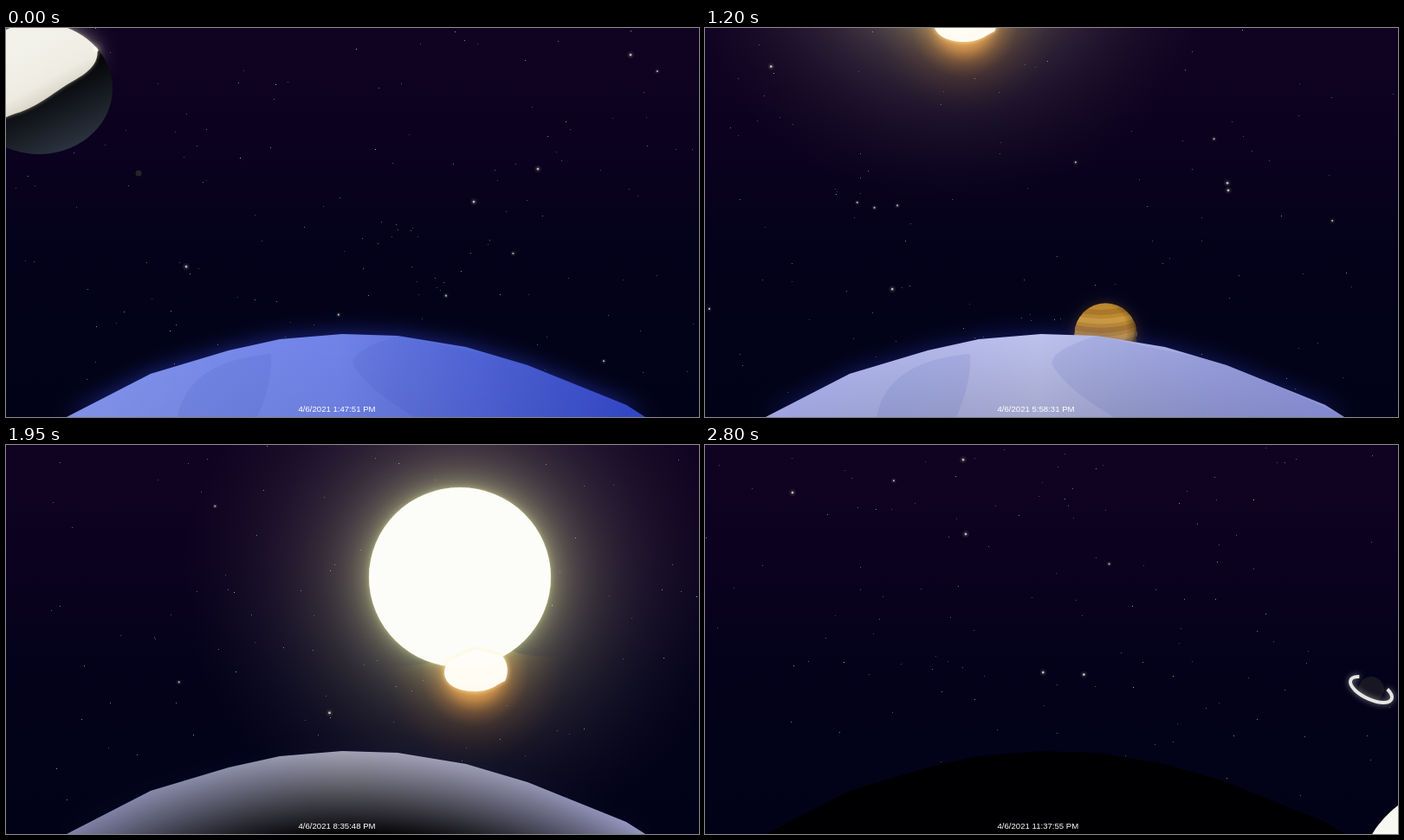
Animation of 800x450 px, one loop 2850 ms. Source, as an HTML page with a canvas:

```html
<!DOCTYPE html>
<html lang="en">
<head>
<meta charset="utf-8">
<title>Night sky</title>
<style>
html, body { margin: 0; width: 100%; height: 100%; overflow: hidden; background: #03021a; }
canvas { display: block; width: 800px; height: 450px; }
</style>
</head>
<body>
<canvas id="stage" width="800" height="450"></canvas>
<script>
const W = 800, H = 450, LOOP = 2850, STEP = 50, FOCAL = 480;
const ctx = document.getElementById('stage').getContext('2d');

// Key steps and the clock (seconds of the day) at each of them
const KEYS = [0, 7, 16, 31, 39, 48, 56];
const CLOCK = [49671, 53870, 59747, 69055, 74148, 80036, 85075];

const mix = (a, b, k) => Array.isArray(a) ? a.map((v, i) => mix(v, b[i], k)) : a + (b - a) * k;
const rgb = (c, a = 1) => `rgba(${c.map(Math.round).join(',')},${a})`;

// Straight lines between key values, held before the first and after the last
function at(values, step, keys = KEYS) {
  const last = values.length - 1;
  if (step <= keys[0]) return values[0];
  if (step >= keys[last]) return values[last];
  const i = keys.findIndex(k => k > step) - 1;
  return mix(values[i], values[i + 1], (step - keys[i]) / (keys[i + 1] - keys[i]));
}

// Smooth curve through a few [step, x, y] points, continued past both ends
function track(points, step) {
  const out = [0, 0];
  for (const p of points) {
    let w = 1;
    for (const q of points) if (q !== p) w *= (step - q[0]) / (p[0] - q[0]);
    out[0] += w * p[1];
    out[1] += w * p[2];
  }
  return out;
}

// The sky turns about one fixed axis, seen through a pinhole camera
const SPIN = [-0.0279, 0.0257, 0.0066];
const RATE = Math.hypot(...SPIN);
const AXIS = SPIN.map(v => v / RATE);

function turn([x, y, z], angle) {
  const [a, b, c] = AXIS, s = Math.sin(angle), co = Math.cos(angle);
  const d = (a * x + b * y + c * z) * (1 - co);
  return [
    x * co + (b * z - c * y) * s + a * d,
    y * co + (c * x - a * z) * s + b * d,
    z * co + (a * y - b * x) * s + c * d
  ];
}
const skyAngle = step => (at(CLOCK, step) - CLOCK[0]) * RATE / FOCAL;

function fix(step, x, y) {
  const v = [x - W / 2, y - H / 2, FOCAL], n = Math.hypot(...v);
  return turn(v.map(c => c / n), -skyAngle(step));
}

function project(v, angle) {
  const [x, y, z] = turn(v, angle);
  return z > 0.2 ? [W / 2 + FOCAL * x / z, H / 2 + FOCAL * y / z] : null;
}

let seed = 20214;
function rand() {
  seed = (seed * 1664525 + 1013904223) >>> 0;
  return seed / 4294967296;
}

function anywhere() {
  const z = rand() * 2 - 1, a = rand() * Math.PI * 2, r = Math.sqrt(1 - z * z);
  return [r * Math.cos(a), r * Math.sin(a), z];
}

// A few landmark stars as [step, x, y]; the rest are scattered
const landmarks = [
  [0, 614, 163], [0, 721, 31], [0, 540, 201], [0, 208, 276], [7, 480, 73], [7, 383, 98],
  [16, 53, 182], [16, 466, 39], [31, 746, 30], [31, 755, 322], [31, 238, 173],
  [48, 252, 124], [48, 303, 124], [48, 702, 64], [56, 301, 103], [56, 298, 17], [56, 101, 55]
];
const bright = [
  ...landmarks.map(p => ({ v: fix(...p), r: 1.5 })),
  ...Array.from({ length: 70 }, () => ({ v: anywhere(), r: 1.1 }))
];
const faint = Array.from({ length: 1500 }, () => ({ v: anywhere(), a: 0.3 + 0.6 * rand() * rand() }));
const rocks = [
  { v: fix(0, 153, 168), r: 3.5, fill: '#262324' },
  { v: fix(31, 453, 233), r: 6.5, fill: '#08051f' }
];

function disc(x, y, rx, ry = rx) {
  ctx.beginPath();
  ctx.ellipse(x, y, rx, ry, 0, 0, Math.PI * 2);
}

function fillDisc(fill, ...place) {
  ctx.fillStyle = fill;
  disc(...place);
  ctx.fill();
}

function gradient(g, stops) {
  for (const [p, c] of stops) g.addColorStop(p, c);
  return g;
}

function drawSky(step) {
  ctx.fillStyle = gradient(ctx.createLinearGradient(0, 0, 0, H), [
    [0, '#100322'], [0.3, '#0b021f'], [0.6, '#03021a'], [1, '#020217']
  ]);
  ctx.fillRect(0, 0, W, H);
  const angle = skyAngle(step);
  for (const s of faint) {
    const p = project(s.v, angle);
    if (!p) continue;
    ctx.fillStyle = `rgba(215,212,215,${s.a})`;
    ctx.fillRect(Math.round(p[0]), Math.round(p[1]), 1, 1);
  }
  for (const s of bright) {
    const p = project(s.v, angle);
    if (!p) continue;
    fillDisc('rgba(150,140,130,0.14)', ...p, s.r * 2.6);
    fillDisc('rgba(225,220,208,0.8)', ...p, s.r);
  }
  for (const r of rocks) {
    const p = project(r.v, angle);
    if (p) fillDisc(r.fill, ...p, r.r);
  }
}

const sunPath = [[31, 387, 5], [39, 524, 153], [48, 700, 332]];
const sunSize = step => at([[105, 104], [120, 110]], step, [39, 48]);

function drawSun(step) {
  if (step < 18) return;
  const [x, y] = track(sunPath, step), [rx, ry] = sunSize(step);
  // Companion below the sun with its orange halo
  const cx = x + 17, cy = y + 109;
  ctx.save();
  ctx.translate(cx, cy + 2);
  ctx.fillStyle = gradient(ctx.createRadialGradient(0, 0, 20, 0, 0, 105), [
    [0, 'rgba(235,150,55,0.95)'], [0.14, 'rgba(205,120,40,0.8)'], [0.3, 'rgba(140,78,28,0.55)'],
    [0.5, 'rgba(75,40,22,0.35)'], [1, 'rgba(40,20,20,0)']
  ]);
  ctx.beginPath();
  ctx.moveTo(-110, -8);
  ctx.quadraticCurveTo(-50, -6, -34, -22);
  ctx.lineTo(34, -30);
  ctx.quadraticCurveTo(60, -16, 110, -20);
  ctx.lineTo(110, 110);
  ctx.lineTo(-110, 110);
  ctx.fill();
  ctx.restore();

  fillDisc('#f7f8f2', x, y, rx, ry);
  ctx.save();
  ctx.shadowColor = '#ffd78c';
  ctx.shadowBlur = 5;
  ctx.fillStyle = '#fffaf0';
  ctx.beginPath();
  ctx.moveTo(cx - 31, cy - 12);
  ctx.bezierCurveTo(cx - 44, cy + 12, cx - 22, cy + 23, cx, cy + 23);
  ctx.bezierCurveTo(cx + 20, cy + 23, cx + 26, cy + 14, cx + 35, cy + 11);
  ctx.bezierCurveTo(cx + 40, cy, cx + 38, cy - 10, cx + 32, cy - 18);
  ctx.lineTo(cx, cy - 26);
  ctx.fill();
  ctx.restore();
}

function drawBloom(step) {
  const power = at([0, 1, 1, 0], step, [19, 24, 49, 55]);
  if (!power) return;
  const [x, y] = track(sunPath, step), [rx, ry] = sunSize(step);
  const edge = 105, reach = 320;
  const glow = ctx.createRadialGradient(0, 0, edge, 0, 0, reach);
  for (let i = 0; i <= 24; i++) {
    const d = (i / 24) ** 2;
    glow.addColorStop(d, rgb(mix([222, 226, 145], [80, 65, 60], Math.sqrt(d)), 0.78 * (1 - d ** 0.35)));
  }
  ctx.save();
  ctx.globalCompositeOperation = 'screen';
  ctx.globalAlpha = power;
  ctx.translate(x, y);
  ctx.scale(rx / edge, ry / edge);
  fillDisc(glow, 0, 0, reach);
  ctx.restore();
}

// Unit-size outline of the moon's lit side
function litSide() {
  ctx.beginPath();
  ctx.arc(0, 0, 1, 2.72, -0.52);
  ctx.bezierCurveTo(0.87, -0.28, 0.72, -0.16, 0.5, -0.06);
  ctx.bezierCurveTo(0.25, 0.05, 0, 0.24, -0.3, 0.32);
  ctx.bezierCurveTo(-0.5, 0.35, -0.68, 0.45, -0.82, 0.44);
  ctx.quadraticCurveTo(-0.88, 0.43, -0.913, 0.41);
}

function drawMoon(step) {
  if (step > 26) return;
  const [x, y] = track([[0, 38, 70], [7, 171, 180], [16, 324, 335]], step);
  const [rx, ry] = at([[85, 76], [78, 72], [72, 72]], step);
  const night = at([[42, 51, 63], [26, 31, 40], [3, 3, 14]], step);
  const lean = at([-0.14, 0.03, 0], step);
  ctx.save();
  ctx.translate(x, y);
  ctx.scale(rx, ry);
  ctx.rotate(lean);

  ctx.shadowColor = 'rgba(255,250,225,0.55)';
  ctx.shadowBlur = 22;
  ctx.fillStyle = '#eee';
  litSide();
  ctx.fill();
  ctx.shadowBlur = 0;
  fillDisc(gradient(ctx.createLinearGradient(-0.15, 0, 0.2, 1), [
    [0, '#040405'], [0.25, rgb(night.map(v => v * 0.3))], [1, rgb(night)]
  ]), 0, 0, 1);

  ctx.shadowColor = '#8a8273';
  ctx.shadowBlur = 4;
  ctx.fillStyle = gradient(ctx.createLinearGradient(-0.32, -0.62, 0.1, 0.36), [
    [0, '#f3f2ea'], [0.6, '#eeece2'], [0.84, '#d9d5c8'], [1, '#a79f90']
  ]);
  litSide();
  ctx.fill();

  // Sliver on the right limb
  ctx.shadowColor = '#fff8dc';
  ctx.shadowBlur = 9;
  ctx.strokeStyle = '#fbf8ec';
  ctx.lineWidth = 0.05;
  ctx.lineCap = 'round';
  ctx.beginPath();
  ctx.arc(0, 0, 0.975, -0.54, at([-0.5, -0.42, -0.22], step));
  ctx.stroke();
  ctx.restore();
}

function drawAmber(step) {
  if (step > 30) return;
  const [x, y] = track([[7, 130, 37], [16, 306, 205]], step);
  const [rx, ry] = at([[50, 45], [45, 41], [36, 36]], step);
  ctx.save();
  ctx.translate(x, y);
  ctx.scale(rx, ry);
  ctx.shadowColor = 'rgba(200,150,60,0.25)';
  ctx.shadowBlur = 14;
  fillDisc('#bd8930', 0, 0, 1);
  ctx.shadowBlur = 0;
  ctx.clip();
  ctx.lineWidth = 0.17;
  for (let i = 0; i < 6; i++) {
    const by = -0.82 + 0.29 * i;
    ctx.strokeStyle = i % 2 ? '#cd9a40' : '#ab7729';
    ctx.beginPath();
    ctx.moveTo(-1.1, by);
    ctx.quadraticCurveTo(0.05, by + 0.28, 1.1, by - 0.12);
    ctx.stroke();
  }
  ctx.fillStyle = gradient(ctx.createRadialGradient(-0.14, -0.16, 0.8, -0.14, -0.16, 1.22), [
    [0, 'rgba(20,12,5,0)'], [0.55, 'rgba(25,16,6,0.3)'], [1, 'rgba(12,8,6,0.92)']
  ]);
  ctx.fillRect(-1.1, -1.1, 2.2, 2.2);
  ctx.restore();
}

function drawRinged(step) {
  if (step < 40) return;
  const ends = [48, 56];
  const [x, y] = track([[48, 595, 126], [56, 769, 283]], step);
  const [rx, ry, tilt, line] = at([[17.5, 5.5, 0.17, 2.4], [26, 11, 0.44, 4]], step, ends);
  const tint = at([[232, 234, 150], [230, 229, 224]], step, ends);
  ctx.save();
  ctx.translate(x, y);
  ctx.rotate(tilt);
  fillDisc(rgb(at([[42, 42, 42], [24, 22, 34]], step, ends)), 0, -1, rx * 0.56, rx * 0.54);
  ctx.strokeStyle = rgb(tint);
  ctx.shadowColor = rgb(tint, 0.6);
  ctx.shadowBlur = 7;
  ctx.lineWidth = line;
  ctx.beginPath();
  ctx.ellipse(0, 0, rx, ry, 0, -0.87, 3.91);
  ctx.stroke();
  ctx.restore();
}

const ground = new Path2D('M70 450L167 400 257 373 316 360 388 354 452 356 531 369 602 390 716 436 738 450Z');
const facets = new Path2D('M198 450Q210 385 306 377Q308 410 290 450ZM452 356Q392 375 402 392Q420 420 472 450H740L602 388Z');

// Left, middle and right colour of the ground
const BLUE = [[128, 144, 232], [112, 131, 232], [52, 72, 198]];
const PALE = [[172, 174, 224], [212, 212, 238], [168, 168, 216]];

function drawGround(step) {
  const light = at([[1, 1, 1], [0.75, 0.74, 0.88], [0, 0.2, 0.85], [0, 0, 0]], step, [31, 39, 48, 56]);
  const tint = mix(BLUE, PALE, Math.min(1, step / 31)).map((c, i) => rgb(c.map(v => v * light[i])));
  const depth = at([2000, 330, 98, 7], step, [0, 31, 39, 48]);
  const air = at([0.6, 0.35, 0], step, [0, 31, 41]);
  ctx.save();
  ctx.shadowColor = `rgba(45,70,215,${air})`;
  ctx.shadowBlur = 26;
  ctx.fillStyle = gradient(ctx.createLinearGradient(100, 0, 720, 0), [
    [0, tint[0]], [0.46, tint[1]], [1, tint[2]]
  ]);
  ctx.fill(ground);
  ctx.restore();

  ctx.save();
  ctx.clip(ground);
  ctx.fillStyle = 'rgba(40,55,170,0.09)';
  if (step < 39) ctx.fill(facets);

  // Night creeping up towards the rim
  const R = 629, inner = Math.max(0, R - depth);
  ctx.fillStyle = gradient(ctx.createRadialGradient(404, 983, inner, 404, 983, R), [
    [0, `rgba(0,0,2,${(R - inner) / depth})`], [1, 'rgba(0,0,2,0)']
  ]);
  ctx.fillRect(0, 340, W, 110);
  ctx.restore();
}

// Below the horizon the sun only shows as a dull olive disc
function drawSunBehind(step) {
  const power = at([0, 1, 1, 0], step, [43, 47, 49, 55]);
  if (!power) return;
  ctx.save();
  ctx.clip(ground);
  ctx.globalAlpha = power;
  fillDisc('rgba(190,193,125,0.95)', ...track(sunPath, step), ...sunSize(step));
  ctx.restore();
}

function drawClock(step) {
  const t = Math.round(at(CLOCK, step)), two = n => String(n).padStart(2, '0');
  const hour = Math.floor(t / 3600) % 12 || 12;
  ctx.font = '9.6px "Liberation Sans", Arial, sans-serif';
  ctx.fillStyle = '#fff';
  ctx.fillText(`4/6/2021 ${hour}:${two(Math.floor(t / 60) % 60)}:${two(t % 60)} PM`, 337.5, 444.3);
}

const layers = [drawSky, drawSun, drawMoon, drawAmber, drawRinged, drawGround, drawSunBehind, drawBloom, drawClock];
const start = performance.now();

function loop() {
  const step = Math.floor((performance.now() - start) % LOOP / STEP);
  for (const draw of layers) draw(step);
  requestAnimationFrame(loop);
}
loop();
</script>
</body>
</html>
```
